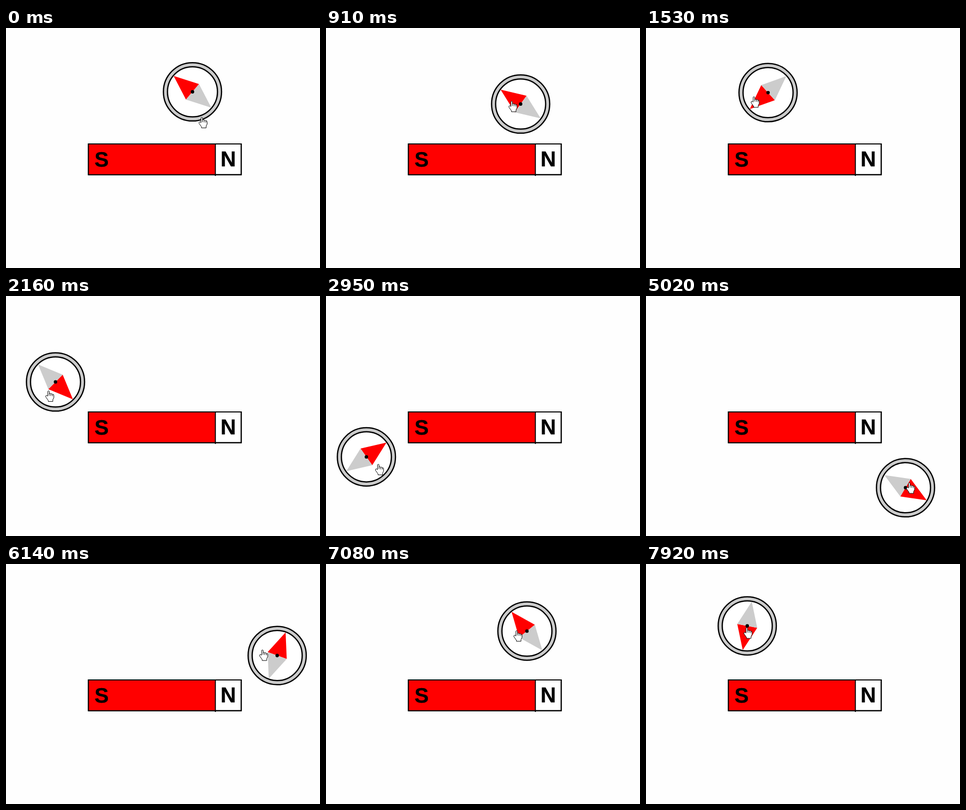
An HTML page that plays this animation: 619x472 px, repeating every 8 s.

```html
<!DOCTYPE html>
<html lang="en">
<head>
<meta charset="utf-8">
<title>Compass around a bar magnet</title>
<style>
  html, body { margin: 0; width: 100%; height: 100%; overflow: hidden; background: #fefefe; }
  svg { display: block; }
  text { font: bold 42px "Liberation Sans", Arial, sans-serif; stroke: #000; stroke-width: .4; }
</style>
</head>
<body>
<svg width="619" height="472" viewBox="0 0 619 472">
  <g stroke="#000" stroke-width="2">
    <rect x="162.5" y="228" width="301.2" height="60.5" fill="#fff"/>
    <rect x="162.5" y="228" width="250" height="60.5" fill="#f00" stroke="none"/>
    <rect x="162.5" y="228" width="301.2" height="60.5" fill="none"/>
    <path d="M412.7 229V291"/>
  </g>
  <text x="174.5" y="273">S</text>
  <text x="423" y="272">N</text>

  <g id="compass">
    <circle r="57.3" fill="#ccc" stroke="#000" stroke-width="2.5"/>
    <circle r="49.3" fill="#fff" stroke="#000" stroke-width="2.5"/>
    <g id="needle">
      <path d="M0-20L48.5 0L0 20Z" fill="#f00"/>
      <path d="M0-20L-48.5 0L0 20Z" fill="#ccc"/>
    </g>
    <circle r="3.4"/>
  </g>

  <g id="hand" stroke="#000" stroke-linejoin="round" fill="#fff">
    <path d="M-1.5 11V1.5Q0-.5 1.5 1.5V6Q3.5 4.5 4.7 6.5Q7 5.5 8 7.5Q10.5 7 10.5 9.5V14L8.5 18V21.5H-.5V19.5L-5.5 12.5Q-6 9.5-3.5 9.5Z"/>
    <path d="M1.5 6V10M4.7 6.5V10.5M8 7.5V11" fill="none"/>
  </g>
</svg>
<script>
const LOOP = 8000, GRAB = 170, NEEDLE_SETTLES = 260;
const REST = { x: 367.6, y: 125.5, angle: 220 };
const REST_POINTER = { x: 386, y: 175 };
const POINTER_LEAD = 100;

// Waypoints of the drag: time, centre x, centre y, needle angle.
const route = [
  [450, 388, 175.5, 228],
  [640, 407, 167, 238],
  [910, 383.7, 149.5, 215.5],
  [1260, 308.5, 121.5, 176],
  [2160, 97.6, 169, 45],
  [2500, 67.2, 235, 8],
  [2910, 76, 312, -30],
  [3620, 317, 366.4, -150.2],
  [3900, 317, 366.4, -150.2],
  [4350, 366.5, 414, -215],
  [4700, 432.5, 400.5, -265],
  [5020, 511.6, 377, -329.2],
  [5680, 547, 250, -375],
  [6140, 534.6, 180, -430],
  [6320, 488, 159.3, -445],
  [6400, 488, 159.3, -445],
  [7220, 369.5, 126, -502],
  [7550, 289.5, 116, -548],
  [7920, 199.6, 121.7, -619.4]
].map(([t, x, y, angle]) => ({ t, x, y, angle }));

// Harmonic mean of the neighbouring rates: smooth, and never overshoots
function slope(i, key) {
  if (i === 0 || i === route.length - 1) return 0;
  const rate = j => (route[j + 1][key] - route[j][key]) / (route[j + 1].t - route[j].t);
  const a = rate(i - 1), b = rate(i);
  return a * b > 0 ? 2 * a * b / (a + b) : 0;
}

function along(key, t) {
  const next = route.findIndex(point => point.t > t);
  if (next === 0) return route[0][key];
  if (next < 0) return route[route.length - 1][key];
  const from = route[next - 1], to = route[next];
  const span = to.t - from.t, u = (t - from.t) / span, v = 1 - u;
  return from[key] * v * v * (1 + 2 * u) + to[key] * u * u * (3 - 2 * u)
    + span * u * v * (v * slope(next - 1, key) - u * slope(next, key));
}

const [compass, needle, hand] = ["compass", "needle", "hand"].map(id => document.getElementById(id));
const place = (node, { x, y }) => node.setAttribute("transform", `translate(${x} ${y})`);

function draw(now) {
  const t = now % LOOP, ahead = t + POINTER_LEAD, held = t >= GRAB;
  const angle = t < NEEDLE_SETTLES ? REST.angle : along("angle", t);
  place(compass, held ? { x: along("x", t), y: along("y", t) } : REST);
  place(hand, held ? { x: along("x", ahead) - 1, y: along("y", ahead) + 3 } : REST_POINTER);
  needle.setAttribute("transform", `rotate(${angle})`);
}

let began;
function tick(now) {
  began ??= now;
  draw(now - began);
  requestAnimationFrame(tick);
}
draw(0);
requestAnimationFrame(tick);
</script>
</body>
</html>
```
